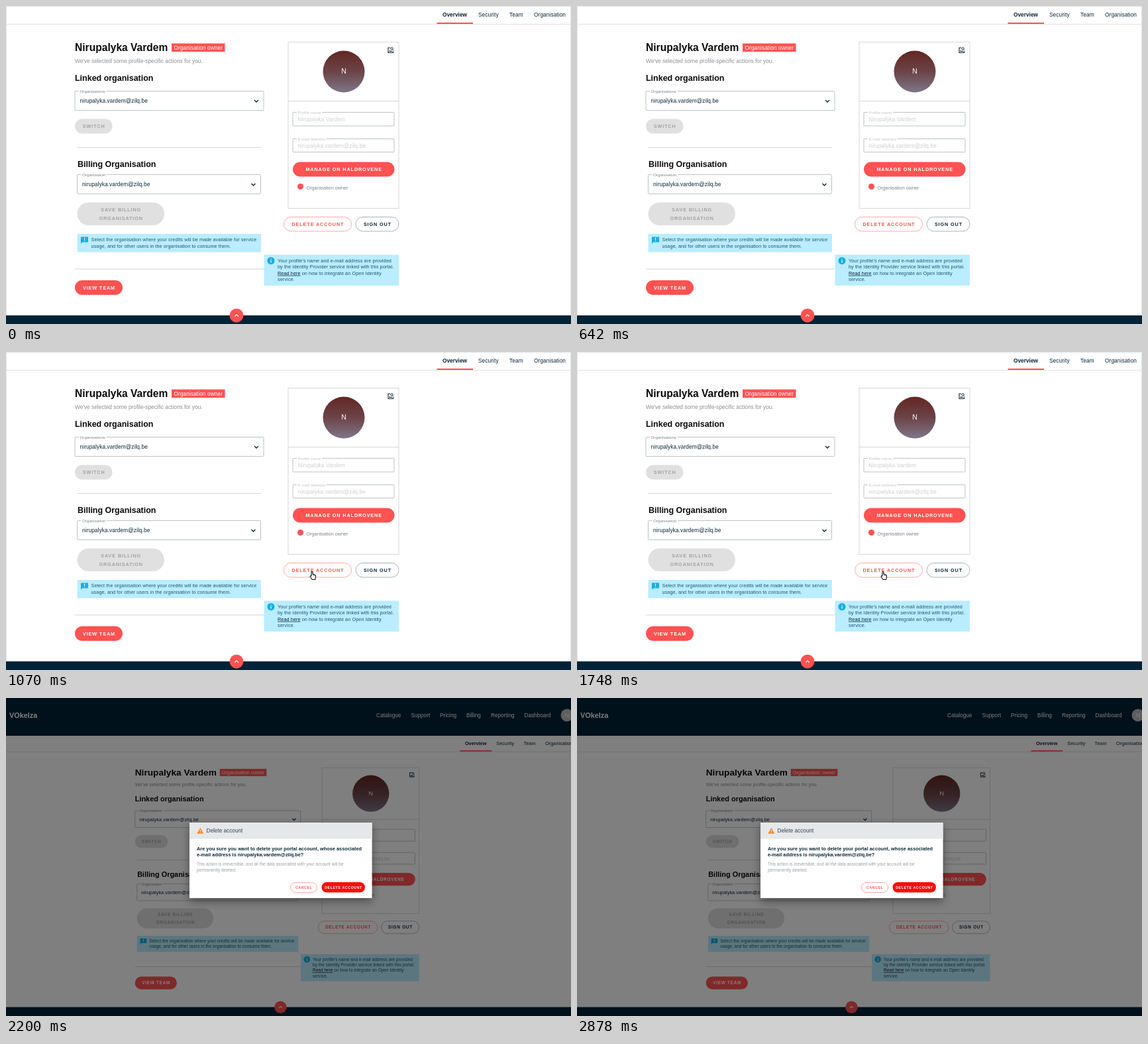
Recreate the animation shown at these times as an HTML page. Size 853 by 480 pixels, loop 3330 ms.

```html
<!DOCTYPE html>
<html lang="en">
<head>
<meta charset="utf-8">
<title>Account page</title>
<style>
html, body { margin: 0; width: 100%; height: 100%; overflow: hidden; background: #fff; }
svg { display: block; width: 853px; height: 480px; font-family: "Liberation Sans", Arial, sans-serif; }
text { white-space: pre; }
</style>
</head>
<body>
<svg id="stage" viewBox="0 0 853 480"></svg>
<script>
const LOOP = 3330, POINT_AT = 1070, DIALOG_AT = 2200;
const RED = '#ff5252', NAVY = '#002337', INK = '#0b2738', GREY = '#8b8f94', BLUE = '#19aee0';
const NAME = 'Nirupalyka Vardem', MAIL = 'nirupalyka.vardem@zilq.be';

const text = (x, y, str, size, fill = INK, extra = '') =>
  `<text x="${x}" y="${y}" font-size="${size}" fill="${fill}" ${extra}>${str}</text>`;
const bold = (x, y, str, size, fill = INK, extra = '') =>
  text(x, y, str, size, fill, `font-weight="700" ${extra}`);
const body = (x, y, str, size = 8.32, fill = INK) => text(x, y, str, size, fill, 'letter-spacing=".078"');
const lines = (x, y, step, rows, draw) => rows.map((row, i) => draw(x, y + i * step, row)).join('');
const rect = (x, y, w, h, fill, stroke = 'none', r = 0) =>
  `<rect x="${x}" y="${y}" width="${w}" height="${h}" rx="${r}" fill="${fill}" stroke="${stroke}"/>`;
const circle = (x, y, r, fill) => `<circle cx="${x}" cy="${y}" r="${r}" fill="${fill}"/>`;
const path = (d, stroke, width = 1, fill = 'none') =>
  `<path d="${d}" stroke="${stroke}" stroke-width="${width}" fill="${fill}"/>`;
const group = (id, content) => `<g id="${id}">${content}</g>`;

function button(x, y, w, h, rows, { fill = RED, color = '#fff', stroke = 'none', size = 7.28, gap = .87 } = {}) {
  rows = [].concat(rows);
  const first = y + h / 2 + size * .36 - (rows.length - 1) * 6.5;
  return rect(x, y, w, h, fill, stroke, h / 2) +
    lines(x + w / 2 + gap / 2, first, 13, rows, (tx, ty, row) =>
      bold(tx, ty, row, size, color, `text-anchor="middle" letter-spacing="${gap}"`));
}

function field(x, y, w, h, label, value, labelColor, color) {
  return rect(x, y, w, h, '#fff', '#bcc3c4', 1) +
    text(x + 7.5, y + 2.2, label, 6.24, labelColor, 'stroke="#fff" stroke-width="4" paint-order="stroke"') +
    body(x + 7.5, y + h / 2 + 3.3, value, 8.32, color);
}

const select = (x, y, w, label) => field(x, y, w, 29, label, MAIL, '#7d868c', INK) +
  path(`M${x + w - 14} ${y + 13.5}l3 3 3-3`, INK, 1.4);

const note = (x, y, w, h) => rect(x, y, w, h, '#b9edff');
const noteText = (x, y, str) => body(x, y, str, 7.28, '#23566e');
const rule = (x, y, w) => rect(x, y, w, 1, '#d6d6d6');
const disabled = { fill: '#e0e0e0', color: '#a3a3a3' };

const nav = rect(-200, 27, 1300, 1, '#dcdfe1') + rect(650.5, 25, 54.5, 2, RED) +
  bold(659, 16.4, 'Overview', 8.32) +
  [[713, 'Security'], [760, 'Team'], [797, 'Organisation']].map(([x, s]) => body(x, 16.4, s)).join('');

const settings =
  bold(104, 67.5, NAME, 15.6, '#0a0a0a') +
  rect(250, 56.5, 80.5, 12.5, RED) + body(253.5, 65.8, 'Organisation owner', 8.32, '#fff') +
  text(104, 86, 'We\'ve selected some profile-specific actions for you.', 8.32, GREY) +
  bold(104, 112.8, 'Linked organisation', 12.48, '#0a0a0a') +
  select(104, 128.5, 285, 'Organisations') +
  button(104, 170.5, 56.5, 22, 'SWITCH', disabled) +
  rule(107.5, 213, 277.5) +
  bold(108, 242.8, 'Billing Organisation', 12.48, '#0a0a0a') +
  select(107.5, 254.5, 277, 'Organisation') +
  button(107.5, 296.5, 131.5, 34.5, ['SAVE BILLING', 'ORGANISATION'], disabled) +
  note(107.5, 344, 277.5, 27.5) +
  path('M113 348.5h11v8h-8.800l-2.200 2.500z', 'none', 0, BLUE) +
  rect(118, 349.7, 1, 3.3, '#fff') + rect(118, 354, 1, 1, '#fff') +
  lines(128.5, 355.2, 9.6, [
    'Select the organisation where your credits will be made available for service',
    'usage, and for other users in the organisation to consume them.'], noteText) +
  rule(104, 396.500, 285) +
  button(104, 414, 72, 22, 'VIEW TEAM');

const profile =
  rect(426, 54.5, 167, 251, '#fff', '#d8d8d8') + rule(426, 143, 167) +
  circle(510, 99, 31.5, 'url(#avatar)') + text(510, 102, 'N', 10.4, '#fff', 'text-anchor="middle"') +
  path('M580 63h-3v7.500h7.500v-2.500', INK, 1.1) + path('M578 69l1.500-2 1.300 1.300 1-1 1.700 1.700z', 'none', 0, INK) +
  `<circle cx="582.5" cy="64.300" r="1.700" fill="none" stroke="${INK}"/>` + path('M583.500 65.500l1.500 1.500', INK) +
  field(433, 160.5, 153, 20.5, 'Profile name', NAME, '#c6c6c6', '#cfcfcf') +
  field(433, 200.5, 153, 20, 'E-mail address', MAIL, '#c6c6c6', '#cfcfcf') +
  button(433, 235.5, 153.5, 22, 'MANAGE ON HALDROVENE') +
  circle(444.5, 272.5, 4.5, RED) + text(453.5, 276.8, 'Organisation owner', 7.28, '#7b868d') +
  button(419.5, 318.5, 102, 21.5, 'DELETE ACCOUNT', { fill: '#fff', color: RED, stroke: '#ffa9a6' }) +
  button(528, 318.5, 65, 21.5, 'SIGN OUT', { fill: '#fff', color: INK, stroke: '#a9b2b7' }) +
  note(389.5, 375.5, 203.5, 46.5) +
  circle(400, 384.5, 5.5, BLUE) + rect(399.4, 383.8, 1.2, 3.600, '#fff') + rect(399.4, 381.500, 1.2, 1.2, '#fff') +
  lines(410, 386.7, 9.5, [
    'Your profile\'s name and e-mail address are provided',
    'by the Identity Provider service linked with this portal.',
    `<tspan text-decoration="underline" fill="${INK}">Read here</tspan> on how to integrate an Open Identity`,
    'service.'], noteText);

const footer = rect(-200, 467, 1300, 30, NAVY) + circle(348, 467.2, 10.5, RED) +
  path('M345.300 468.500l2.700-2.700 2.700 2.700', '#fff', 1.2);

const edge = path('M0 .5H853M.5 0V467M852.5 0V467', '#dfe5e8');

const hand = path('M461 338v-5.500q0-1.200 1-1.200t1 1.200v3q2.300-.2 4 1.200.8.600.5 2.500l-.8 4.300h-4.500l-2.700-4q-.7-1.400.2-1.700z',
  '#111', 1.1, '#fff') + path('M464.500 336v2M466 336.500v1.500', '#111', .6);

const header = rect(0, 0, 853, 57, NAVY) + bold(5, 29.5, 'VOkelza', 10.9, '#fff') +
  [[559, 'Catalogue'], [611.5, 'Support'], [655, 'Pricing'], [695, 'Billing'], [732, 'Reporting'], [782.5, 'Dashboard']]
    .map(([x, s]) => text(x, 28.5, s, 8.2, '#fff')).join('') +
  circle(847, 26, 9.5, '#bdbdbd') + text(847, 29.2, 'N', 9, '#fff', 'text-anchor="middle"');

const small = { size: 5.2, gap: .65 };
const dialog = header + rect(0, 0, 853, 480, 'rgba(0,0,0,.5)') +
  `<g filter="url(#shadow)">${rect(277, 188, 275.5, 114, '#fff')}</g>` +
  rect(277, 188, 275.5, 24.5, '#e6e7e9') +
  path('M293.300 196l4.900 8.700h-9.800z', 'none', 0, '#f5861f') +
  rect(292.8, 199, 1, 2.600, '#fff') + rect(292.8, 202.5, 1, 1, '#fff') +
  text(302.5, 203, 'Delete account', 8.23, '#32495a') +
  lines(288, 229.6, 9.5, [
    'Are you sure you want to delete your portal account, whose associated',
    `e-mail address is ${MAIL}?`], (x, y, s) => bold(x, y, s, 7.31, INK, 'letter-spacing=".03"')) +
  lines(288, 253.2, 8.5, [
    'This action is irreversible, and all the data associated with your account will be',
    'permanently deleted.'], (x, y, s) => text(x, y, s, 6.42, '#9a9fa3')) +
  button(429.5, 278.5, 40, 15, 'CANCEL', { ...small, fill: '#fff', color: RED, stroke: '#ffa9a6' }) +
  button(476.5, 278, 65.5, 15.5, 'DELETE ACCOUNT', { ...small, fill: '#fb0d0d' });

const stage = document.getElementById('stage');
stage.innerHTML = `<defs>
  <linearGradient id="avatar" x2="0" y2="1">
    <stop stop-color="#642623"/><stop offset=".5" stop-color="#6b4448"/><stop offset="1" stop-color="#7f7688"/>
  </linearGradient>
  <filter id="shadow" x="-20%" y="-30%" width="140%" height="170%">
    <feDropShadow dx="0" dy="5" stdDeviation="7" flood-opacity=".4"/>
  </filter></defs>` +
  group('nav', nav) + group('page', settings + profile) + group('footer', footer) +
  group('edge', edge) + group('hand', hand) + group('dialog', dialog);

const part = id => document.getElementById(id);
const show = (id, on) => part(id).setAttribute('display', on ? 'inline' : 'none');
const zoomedOut = { nav: [115, 57], page: [103.5, 57.4], footer: [109.3, 57] };

function draw() {
  const t = performance.now() % LOOP;
  const asking = t >= DIALOG_AT;
  for (const [id, [x, y]] of Object.entries(zoomedOut))
    part(id).setAttribute('transform', asking ? `translate(${x} ${y}) scale(.877)` : '');
  show('edge', !asking);
  show('hand', t >= POINT_AT && !asking);
  show('dialog', asking);
  requestAnimationFrame(draw);
}
draw();
</script>
</body>
</html>
```
